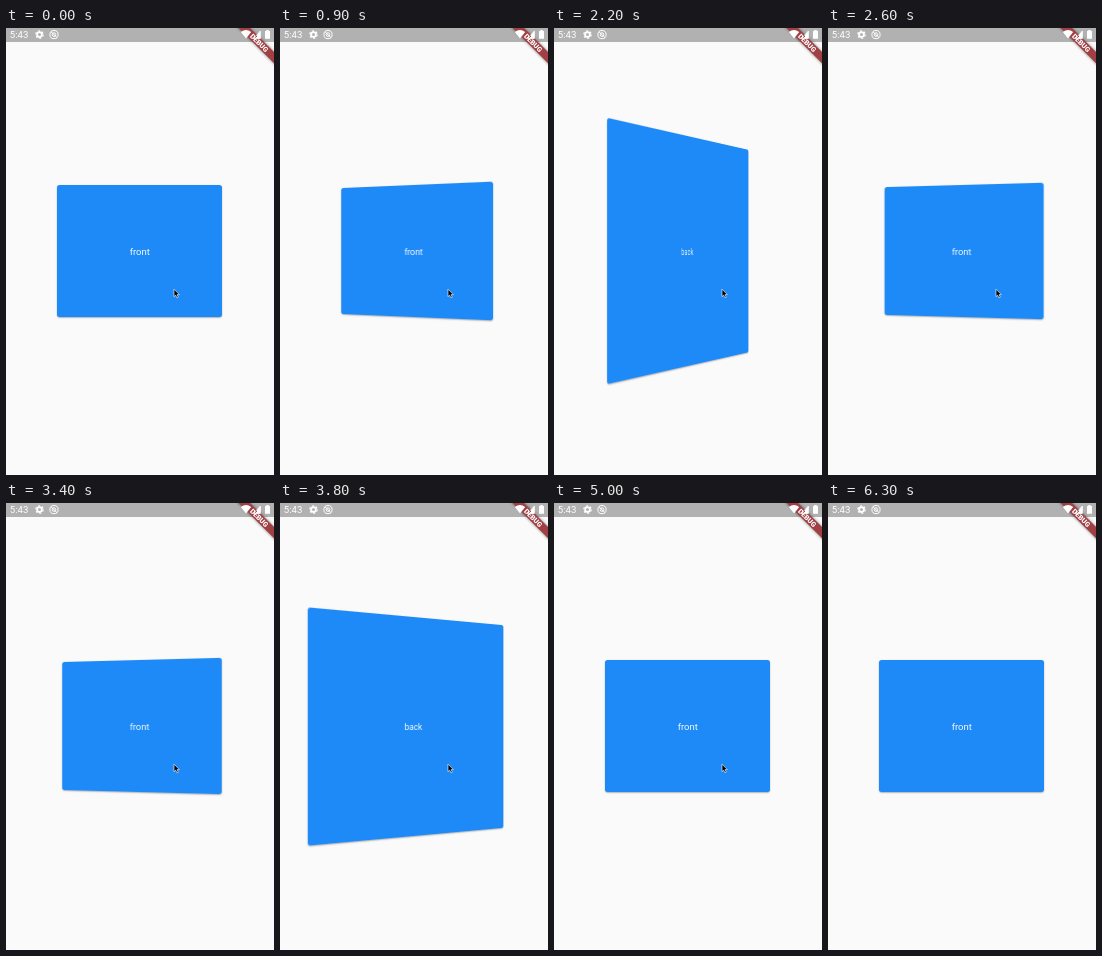
An HTML page that plays this animation: 268x447 px, repeating every 6.8 s.

```html
<!DOCTYPE html>
<html lang="en">
<head>
<meta charset="utf-8">
<title>Card flip</title>
<style>
  html, body { margin: 0; width: 100%; height: 100%; overflow: hidden; background: #fafafa; }
  #stage {
    position: relative; width: 268px; height: 447px; overflow: hidden;
    perspective: 678px; perspective-origin: 133.8px 223.4px;
  }
  #card {
    position: absolute; left: 133.8px; top: 223.4px;
    display: flex; align-items: center; justify-content: center;
    border-radius: 2.7px; background: #1e8af7; color: #f4f9ff;
    font: 9.5px Roboto, sans-serif;
    box-shadow: 0 .7px 1.5px rgba(0, 0, 0, .35);
  }
  svg { position: absolute; left: 0; top: 0; }
</style>
</head>
<body>
<div id="stage">
  <div id="card"></div>
  <svg width="268" height="447" font-family="Roboto, sans-serif" fill="#fff">
    <defs>
      <filter id="blur" x="-20%" y="-100%" width="140%" height="300%"><feGaussianBlur stdDeviation="1.6"/></filter>
    </defs>
    <rect width="268" height="14" fill="#b1b1b1"/>
    <g transform="translate(268 0) rotate(45)">
      <rect x="-28" y="17" width="56" height="8" fill="#000" opacity=".5" filter="url(#blur)"/>
      <rect x="-28" y="17" width="56" height="8" fill="#a14044"/>
      <text y="23.5" font-size="7" font-weight="900" text-anchor="middle">DEBUG</text>
    </g>
    <text x="3.8" y="10" font-size="9.6">5:43</text>
    <g fill="none" stroke="#fff">
      <circle cx="33.5" cy="6.6" r="2.4" stroke-width="1.8"/>
      <circle cx="33.5" cy="6.6" r="3.7" stroke-width="1.2" stroke-dasharray="1.94"/>
      <circle cx="48" cy="6.6" r="4.1"/>
      <circle cx="48" cy="6.6" r="1.8"/>
      <path d="M45 3.8L51 9.6"/>
    </g>
    <path d="M234.8 4Q240 0 245.2 4L240 10.6Z"/>
    <path d="M247.6 10.4L254.4 3V10.4Z" fill="none" stroke="#fff" stroke-width=".8"/>
    <path d="M251 7L254.4 3V10.4H251Z"/>
    <path d="M259 3H260.3V2H262.7V3H264V10.8H259Z"/>
    <path id="cursor" d="M168 261.2V268.6L169.7 267.1L170.9 269.8L172.3 269.2L171.1 266.6H173.4Z" fill="#000" stroke="#fff" stroke-width=".6"/>
  </svg>
</div>
<script>
const LOOP = 6800, FLIP = 900, CURSOR_GONE = 5800;
const FRONT = { w: 165, h: 132 }, BACK = { w: 231, h: 231 };
const flips = [[792, 1], [2021, 0], [3318, 1], [3975, 0]];
const card = document.getElementById('card');
const cursor = document.getElementById('cursor');

const mix = (a, b, k) => a + (b - a) * k;

function bezier(x1, y1, x2, y2) {
  const at = (a, b, s) => 3 * a * s * (1 - s) ** 2 + 3 * b * s * s * (1 - s) + s ** 3;
  return x => {
    if (x <= 0) return 0;
    if (x >= 1) return 1;
    let lo = 0, hi = 1;
    for (let i = 0; i < 24; i++) {
      const mid = (lo + hi) / 2;
      if (at(x1, x2, mid) < x) lo = mid; else hi = mid;
    }
    return at(y1, y2, lo);
  };
}

const turnEase = bezier(.25, .1, .25, 1);
const growEase = bezier(.5, 0, .5, 1);
const growDuring = u => growEase((u - .17) / .5);

// Each flip starts from wherever the previous one has got to.
const progress = (t, ease) =>
  flips.reduce((v, [start, side]) => mix(v, side, ease((t - start) / FLIP)), 0);

function draw(now) {
  const t = now % LOOP;
  const turn = progress(t, turnEase), size = progress(t, growDuring);
  const isBack = turn > .5;
  const w = mix(FRONT.w, BACK.w, size), h = mix(FRONT.h, BACK.h, size);
  card.textContent = isBack ? 'back' : 'front';
  card.style.width = w + 'px';
  card.style.height = h + 'px';
  card.style.margin = `${-h / 2}px 0 0 ${-w / 2}px`;
  card.style.transform = `rotateY(${180 * (isBack - turn)}deg)`;
  cursor.style.display = t < CURSOR_GONE ? '' : 'none';
}

const begin = performance.now();
function tick() {
  draw(performance.now() - begin);
  requestAnimationFrame(tick);
}
tick();
</script>
</body>
</html>
```
